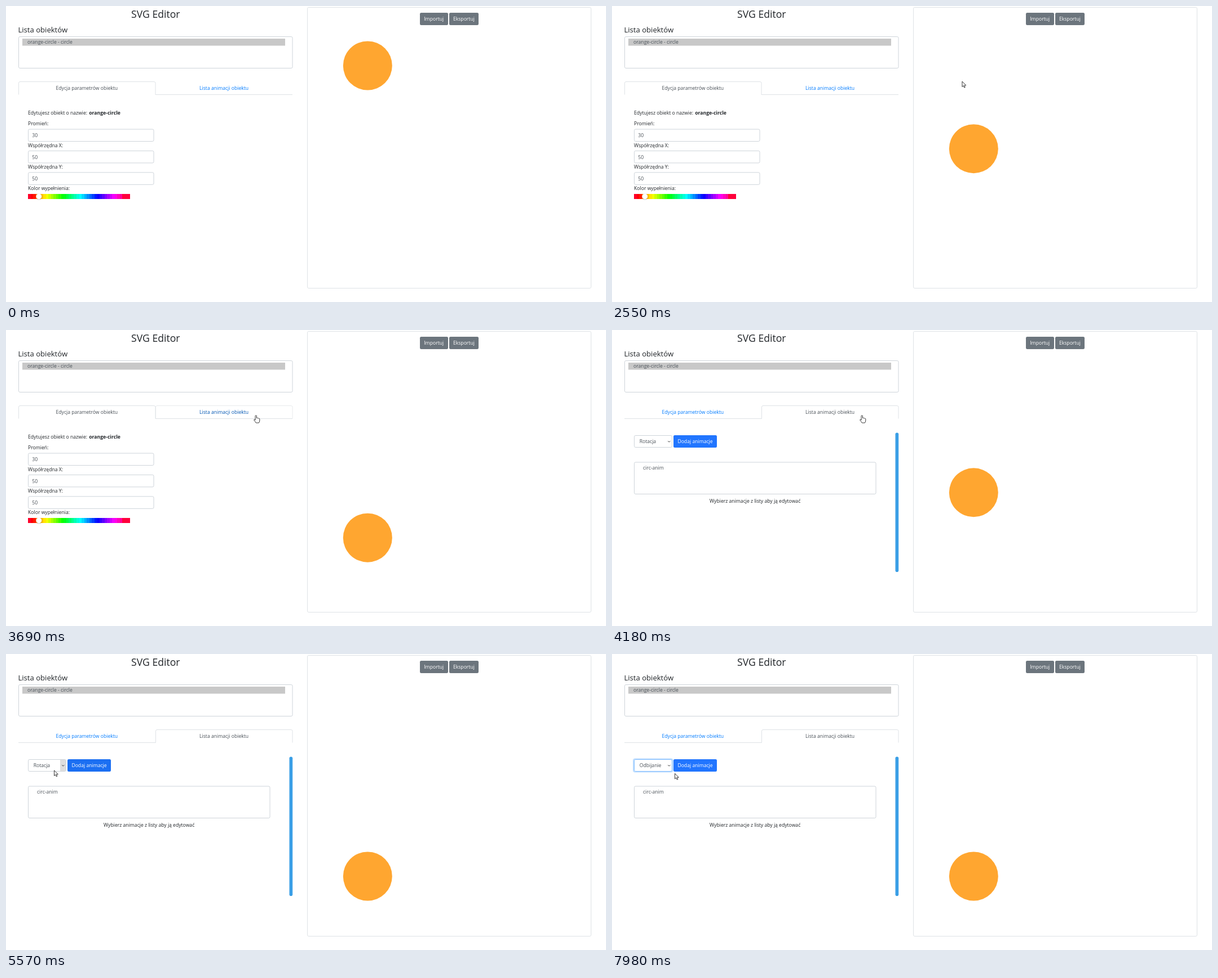
Recreate the animation shown at these times as an HTML page. Size 1064 by 526 pixels, loop 8000 ms.

```html
<!DOCTYPE html>
<html lang="pl">
<head>
<meta charset="utf-8">
<title>SVG Editor</title>
<style>
  html, body { margin: 0; width: 100%; height: 100%; overflow: hidden; background: #fff; }
  svg { display: block; width: 1064px; height: 526px; }
  text { font: 8.65px "Open Sans", "Noto Sans", sans-serif; fill: #212529; }
  .mid { text-anchor: middle; }
  .head { font-weight: 500; }
  .gray { fill: #495057; }
  .white { fill: #fff; }
  .box { fill: #fff; stroke: #ced4da; }
  .line { fill: none; stroke: #dee2e6; }
  .btn { fill: #6c757d; }
</style>
</head>
<body>
<svg viewBox="0 0 1064 526">
  <text class="mid head" x="265.3" y="20.5" style="font-size:17.6px">SVG Editor</text>
  <text class="head" x="21.5" y="46.5" style="font-size:13.1px">Lista obiektów</text>
  <rect class="box" x="22.5" y="54.5" width="485.5" height="56" rx="2.3"/>
  <rect x="29" y="58" width="466" height="12.5" fill="#c8c8c8"/>
  <text class="gray" x="38" y="67.3">orange-circle - circle</text>

  <path id="hoverTab" class="line" d="M265.5 157V137q0-2.500 2.500-2.500H505.500q2.500 0 2.500 2.500V157" stroke-opacity=".7"/>
  <path id="tabs" class="line"/>
  <text id="tabA" class="mid" x="143.300" y="149.300">Edycja parametrów obiektu</text>
  <text id="tabB" class="mid" x="386.600" y="149.300">Lista animacji obiektu</text>

  <g id="paneA">
    <text x="39" y="192.700">Edytujesz obiekt o nazwie:</text>
    <text x="147.200" y="192.700" style="font-weight:700">orange-circle</text>
    <g id="fields"></g>
    <text x="39" y="327.300">Kolor wypełnienia:</text>
    <g id="hues" shape-rendering="crispEdges"></g>
    <circle cx="58.300" cy="339" r="5.600" fill="#000" opacity=".18"/>
    <circle cx="58.300" cy="338.500" r="5" fill="#fff"/>
  </g>

  <g id="paneB">
    <rect x="502.500" y="182.500" width="5.700" height="247.500" rx="2.800" fill="#3a9fe6"/>
    <rect id="ring" x="38" y="186.500" width="69.500" height="23" rx="3" fill="none" stroke="#bfdeff" stroke-width="2"/>
    <rect id="select" class="box" x="39.500" y="187.500" width="67" height="21" rx="2.300"/>
    <rect id="arrowBg" x="96" y="188" width="10" height="20" fill="#dedede"/>
    <path d="M99.300 197.200l2 2 2-2" fill="none" stroke="#333" stroke-width="1"/>
    <text id="choice" class="gray" x="48.700" y="201.300"></text>
    <rect id="add" x="109" y="187" width="77" height="22" rx="2.300"/>
    <text class="mid white" x="147.500" y="201.300">Dodaj animacje</text>
    <rect class="box" x="39.500" y="235" width="428.500" height="56.500" rx="2.300"/>
    <text class="gray" x="55" y="248.300">circ-anim</text>
    <text class="mid" x="253.700" y="306.700">Wybierz animacje z listy aby ją edytować</text>
    <g id="menu">
      <rect x="39.500" y="209.500" width="67" height="63.500" fill="#fff" stroke="#8a8f94"/>
      <rect id="pick" x="40" width="66" height="12.600" fill="#1e90ff"/>
    </g>
  </g>

  <rect class="line" x="534.500" y="2.500" width="503" height="499" rx="2.300"/>
  <rect class="btn" x="734" y="12" width="50" height="22" rx="2.300"/>
  <text class="mid white" x="758.700" y="26.300">Importuj</text>
  <rect class="btn" x="786" y="12" width="52" height="22" rx="2.300"/>
  <text class="mid white" x="811.900" y="26.300">Eksportuj</text>
  <circle id="ball" cx="641.300" r="43.500" fill="#ffa630"/>

  <g id="cursor" fill="#fff" stroke="#222" stroke-width=".9" stroke-linejoin="round">
    <path id="arrow" d="M0 0V9.600L2.200 7.600 3.700 11 5.300 10.300 3.800 7H6.800Z"/>
    <path id="hand" d="M-1.200 .9Q0-.5 1.200 .9V5Q2.400 4.200 3.200 5.300 4.600 4.600 5.200 5.800 6.400 5.400 6.500 6.800V9.500Q6.300 12 5 13.500H0Q-1.500 11-3.300 9-4 7.400-2.500 7.500L-1.200 8.600Z"/>
  </g>
</svg>
<script>
const LOOP = 8000;
const $ = id => document.getElementById(id);
const show = (id, on) => $(id).setAttribute('visibility', on ? 'inherit' : 'hidden');

function add(parent, tag, attrs, text) {
  const el = document.createElementNS('http://www.w3.org/2000/svg', tag);
  for (const key in attrs) el.setAttribute(key, attrs[key]);
  if (text) el.textContent = text;
  return parent.appendChild(el);
}

[['Promień:', 30], ['Współrzędna X:', 50], ['Współrzędna Y:', 50]].forEach(([label, value], i) => {
  const y = 219 + i * 38.4, g = $('fields');
  add(g, 'text', { x: 39, y: y - 6.7 }, label);
  add(g, 'rect', { class: 'box', x: 39.5, y, width: 222.5, height: 21.5, rx: 2.3 });
  add(g, 'text', { class: 'gray', x: 46.3, y: y + 14.3 }, String(value));
});

for (let i = 0; i < 40; i++) {
  add($('hues'), 'rect', {
    x: 39 + i * 4.525, y: 334, width: 4.6, height: 9,
    fill: `hsl(${i < 3 ? 350 + i * 8 : i > 36 ? 346 : i * 9} 100% 50%)`
  });
}

const ROW = 12.6, TOP = 210;
const options = ['Rotacja', 'Odbijanie', 'Skalowanie', 'Przesuwanie', 'Kolor'].map((name, i) =>
  add($('menu'), 'text', { x: 44, y: TOP + i * ROW + 9.3 }, name));

// Interpolates rows of [time, ...values] with the given easing.
function track(rows, t, ease = k => k) {
  if (t <= rows[0][0]) return rows[0].slice(1);
  for (let i = 1; i < rows.length; i++) {
    const a = rows[i - 1], b = rows[i];
    if (t < b[0]) {
      const k = ease((t - a[0]) / (b[0] - a[0]));
      return a.slice(1).map((v, j) => v + (b[j + 1] - v) * k);
    }
  }
  return rows[rows.length - 1].slice(1);
}

const soft = k => 0.5 * k + 0.5 * k * k * (3 - 2 * k);

const path = [
  [380, 997, 510.5], [1180, 715.5, 230.5], [1810, 660.5, 126.5], [1910, 656.8, 122.8],
  [2140, 656.8, 122.8], [2940, 587.5, 144.5], [3690, 443.3, 151.5], [4570, 443.3, 151.5],
  [4620, 438, 163.5], [5470, 101, 203], [5570, 85.5, 206.8], [6260, 85.5, 206.8],
  [6730, 88, 236.7], [7060, 88, 236.7], [7260, 86, 226], [7560, 86, 226], [7980, 111.5, 212.3]
];
const addHover = [[5320, 0], [5420, 1], [5570, 0.4], [5750, 0.4], [5800, 0]];

// Drop and bounces: middle time, half duration, height above the floor.
const FLOOR = 395;
const arcs = [[2105, 624, 289], [3228, 499, 186], [4118, 391, 109], [4821, 312, 72]];

function ballY(t) {
  if (t < arcs[0][0]) return FLOOR - arcs[0][2];
  for (const [mid, half, height] of arcs) {
    const k = (t - mid) / half;
    if (k < 1) return FLOOR - height * (1 - k * k);
  }
  return FLOOR;
}

const inside = (x, y, l, t, r, b) => x >= l && x <= r && y >= t && y <= b;

function draw(t) {
  const [x, y] = track(path, t, soft);
  const second = t >= 3830, open = t >= 5780 && t < 7560;
  const onTab = inside(x, y, 265, 134, 508, 158);
  const onAdd = second && inside(x, y, 109, 187, 186, 209);

  $('ball').setAttribute('cy', ballY(t));

  $('tabs').setAttribute('d', second
    ? 'M22 157.5H265.5V137q0-2.500 2.500-2.500H505.500q2.500 0 2.500 2.500V157.500'
    : 'M22.500 157.500V137q0-2.500 2.500-2.500H262.500q2.500 0 2.500 2.500V157.500H508');
  show('hoverTab', onTab && !second);
  $('tabA').style.fill = second ? '#007bff' : '#495057';
  $('tabB').style.fill = second ? '#495057' : onTab ? '#0056b3' : '#007bff';
  show('paneA', !second);
  show('paneB', second);

  const focus = track([[5750, 0], [5900, 1]], t)[0];
  $('ring').setAttribute('opacity', focus);
  $('select').style.stroke = focus > 0.5 ? '#80bdff' : '#ced4da';
  show('arrowBg', second && t >= 5450 && t < 7600);
  $('choice').textContent = t < 7560 ? 'Rotacja' : 'Odbijanie';

  const h = track(addHover, t)[0];
  $('add').setAttribute('fill', `rgb(${33 - 15 * h},${117 - 16 * h},${255 - 33 * h})`);

  show('menu', second && open);
  const row = Math.max(0, Math.floor((y - TOP) / ROW));
  $('pick').setAttribute('y', TOP + row * ROW);
  options.forEach((el, i) => { el.style.fill = i === row ? '#fff' : '#495057'; });

  show('cursor', t >= 380);
  $('cursor').setAttribute('transform', `translate(${x} ${y})`);
  const hand = onTab || onAdd;
  $('arrow').style.display = hand ? 'none' : '';
  $('hand').style.display = hand ? '' : 'none';
}

const start = performance.now();
function tick() {
  draw((performance.now() - start) % LOOP);
  requestAnimationFrame(tick);
}
tick();
</script>
</body>
</html>
```
